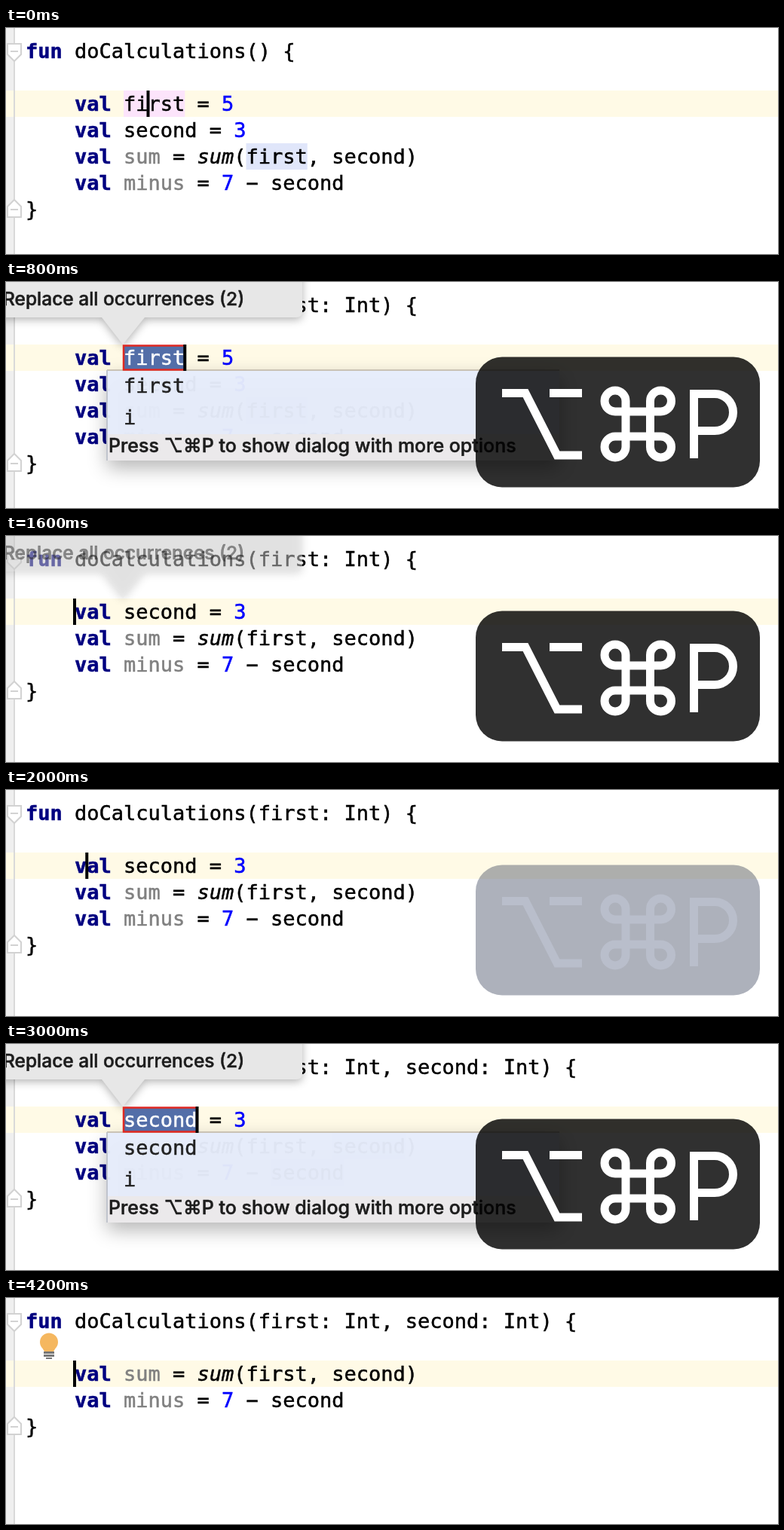
Recreate the animation shown at these times as an HTML page with a canvas. Size 1024x300 px, loop 5.2 s.

```html
<!DOCTYPE html>
<html lang="en">
<head>
<meta charset="utf-8">
<style>
html, body { margin: 0; width: 100%; height: 100%; overflow: hidden; background: #fff; }
canvas { display: block; }
</style>
</head>
<body>
<canvas id="stage" width="1024" height="300"></canvas>
<script>
const c = document.getElementById('stage').getContext('2d');
const LOOP = 5200, STEP = 200, LEFT = 26, CHAR = 16.25, ROW = 35;
const MONO = '27px "DejaVu Sans Mono", monospace';
const SANS = 'Inter, "DejaVu Sans", sans-serif';
const BODY = [
  'val first = 5',
  'val second = 3',
  'val sum = sum(first, second)',
  'val minus = 7 − second'
];
const PARAMS = ['', 'first: Int', 'first: Int, second: Int'];

const rowTop = row => 13 + ROW * row;
const colX = col => LEFT + CHAR * col;

function box(x, y, w, h, color) {
  c.fillStyle = color;
  c.fillRect(x, y, w, h);
}

// A hairline outline gives the slightly heavy screen rendering
function text(s, x, y, font, color) {
  c.font = font;
  c.fillStyle = c.strokeStyle = color;
  c.lineWidth = 0.5;
  c.fillText(s, x, y);
  c.strokeText(s, x, y);
}

function poly(points) {
  points.forEach(([x, y], i) => i ? c.lineTo(x, y) : c.moveTo(x, y));
}

// Style of a token, judged by what follows it
function style(token, after) {
  if (/^(fun|val)$/.test(token)) return ['bold ', '#000080'];
  if (/^\d$/.test(token)) return ['', '#0000ff'];
  if (/^(sum|minus)$/.test(token)) return after === '(' ? ['italic ', '#000'] : ['', '#808080'];
  return ['', '#000'];
}

function codeLine(s, row, indent, word) {
  for (const m of s.matchAll(/\w+|[^\w\s]/g)) {
    const [token] = m, x = colX(indent + m.index);
    if (token === word && row > 0)
      box(x, rowTop(row), CHAR * token.length, ROW, row === 2 ? '#fce4fb' : '#e0e6fa');
    const [weight, color] = style(token, s[m.index + token.length]);
    text(token, x, rowTop(row) + 27, weight + MONO, color);
  }
}

// dir 1 points down, -1 points up
function fold(row, dir) {
  const y = rowTop(row) + 18;
  c.beginPath();
  poly([[2, y - 10 * dir], [20, y - 10 * dir], [20, y + 4 * dir], [11, y + 13 * dir], [2, y + 4 * dir]]);
  c.closePath();
  c.fillStyle = '#fff';
  c.fill();
  c.moveTo(6, y);
  c.lineTo(16, y);
  c.lineWidth = 2;
  c.strokeStyle = '#d2d2d2';
  c.stroke();
}

function bulb() {
  c.beginPath();
  c.arc(57, 58.5, 12, Math.PI * 0.75, Math.PI * 0.25);
  c.lineTo(63, 71);
  c.lineTo(51, 71);
  c.fillStyle = '#f5b75f';
  c.fill();
  box(50, 71, 14, 3, '#777');
  box(50, 75, 14, 3, '#777');
  box(53, 79, 8, 2, '#777');
}

function shadow(alpha, blur, y) {
  c.shadowColor = `rgba(0,0,0,${alpha})`;
  c.shadowBlur = blur;
  c.shadowOffsetY = y;
}

function balloon(alpha) {
  c.save();
  c.globalAlpha = alpha;
  shadow(0.3, 12, 3);
  c.beginPath();
  poly([[-20, -20], [393, -20], [393, 39]]);
  c.quadraticCurveTo(393, 47, 385, 47);
  c.lineTo(184, 47);
  c.lineTo(155, 83);
  c.lineTo(127, 47);
  c.lineTo(-20, 47);
  c.fillStyle = '#e7e7e7';
  c.fill();
  shadow(0, 0, 0);
  text('Replace all occurrences (2)', -4, 31, '500 24.5px ' + SANS, '#1c1c1c');
  c.restore();
}

function popup(word, alpha) {
  c.save();
  c.globalAlpha = alpha;
  shadow(0.3, 24, 10);
  box(134, 117, 600, 120, '#e8eefc');
  shadow(0, 0, 0);
  box(134, 202, 600, 35, '#eceaeb');
  box(134, 116, 600, 2, '#c9c2b4');
  box(133, 117, 2, 120, '#bfc3cc');
  c.restore();
  text(word, 156, 147, MONO, '#222');
  text('i', 156, 189, MONO, '#222');
  text('Press ⌥⌘P to show dialog with more options', 136, 226, '500 25px ' + SANS, '#1c1c1c');
}

function selection(word) {
  const w = CHAR * word.length, x = colX(8);
  box(x, 84, w, 33, '#536ea8');
  text(word, x, 110, MONO, '#fff');
  c.strokeStyle = '#e02a22';
  c.lineWidth = 2.5;
  c.strokeRect(x, 84.5, w, 32);
}

function shortcut(faded) {
  c.beginPath();
  c.roundRect(623, 99.5, 377, 173, 35);
  c.fillStyle = faded ? 'rgba(50,60,85,.4)' : 'rgba(0,0,0,.81)';
  c.fill();

  c.beginPath();
  poly([[658, 147.5], [689, 147.5], [731, 230], [764, 230]]);
  poly([[721, 147.5], [764, 147.5]]);
  // Four three-quarter loops joined by straight bars
  const q = Math.PI / 2, r = 14;
  c.moveTo(808, 172);
  c.arc(808, 158, r, q, 4 * q);
  c.arc(808, 219, r, 0, 3 * q);
  c.arc(868.5, 219, r, 3 * q, 6 * q);
  c.arc(868.5, 158, r, 2 * q, 5 * q);
  c.closePath();
  poly([[912.5, 234], [912.5, 148.5], [940, 148.5]]);
  c.arc(940, 173, 24.5, -q, q);
  c.lineTo(912.5, 197.5);
  c.strokeStyle = faded ? '#b9becb' : '#fff';
  c.lineWidth = 11;
  c.stroke();
}

function caretCol(t, word) {
  if (t < 800) return 10;
  if (word) return 8 + word.length;
  if (t >= 2000 && t < 3000) return 5 + (t - 2000) / STEP;
  return 4;
}

function draw(t) {
  const within = (a, b) => t >= a && t < b;
  const removed = t < 1600 ? 0 : t < 3200 ? 1 : 2;
  const added = t < 800 ? 0 : t < 3000 ? 1 : 2;
  const editing = within(800, 1600) ? 'first' : within(3000, 3200) ? 'second' : '';
  const marked = t < 1600 ? 'first' : within(2600, 3200) ? 'second' : '';
  const lines = BODY.slice(removed), last = lines.length + 2;

  box(0, 0, 1024, 300, '#fff');
  box(0, 0, 11, 300, '#efefef');
  box(0, rowTop(2), 1024, ROW, '#fffae6');
  box(10, 0, 2, 300, '#d9d9d9');
  fold(0, 1);
  fold(last, -1);

  codeLine(`fun doCalculations(${PARAMS[added]}) {`, 0, 0);
  lines.forEach((s, i) => codeLine(s, i + 2, 4, marked));
  codeLine('}', last, 0);

  if (within(200, 800) || within(2800, 3000) || t >= 4200) bulb();
  if (within(800, 1400) || within(3000, 3200))
    popup(editing, t === 800 || t === 3000 ? 0.96 : 1);
  if (editing) balloon(1);
  else if (t === 1600 || t === 3200) balloon(0.45);
  if (editing) selection(editing);
  box(colX(caretCol(t, editing)) - 2, rowTop(2), 4, ROW, '#000');

  if (within(800, 2200) || within(3000, 4000)) shortcut(t === 2000 || t === 3800);
}

function tick(now) {
  draw(Math.min(4200, Math.floor(now % LOOP / STEP) * STEP));
  requestAnimationFrame(tick);
}
tick(performance.now());
</script>
</body>
</html>
```
